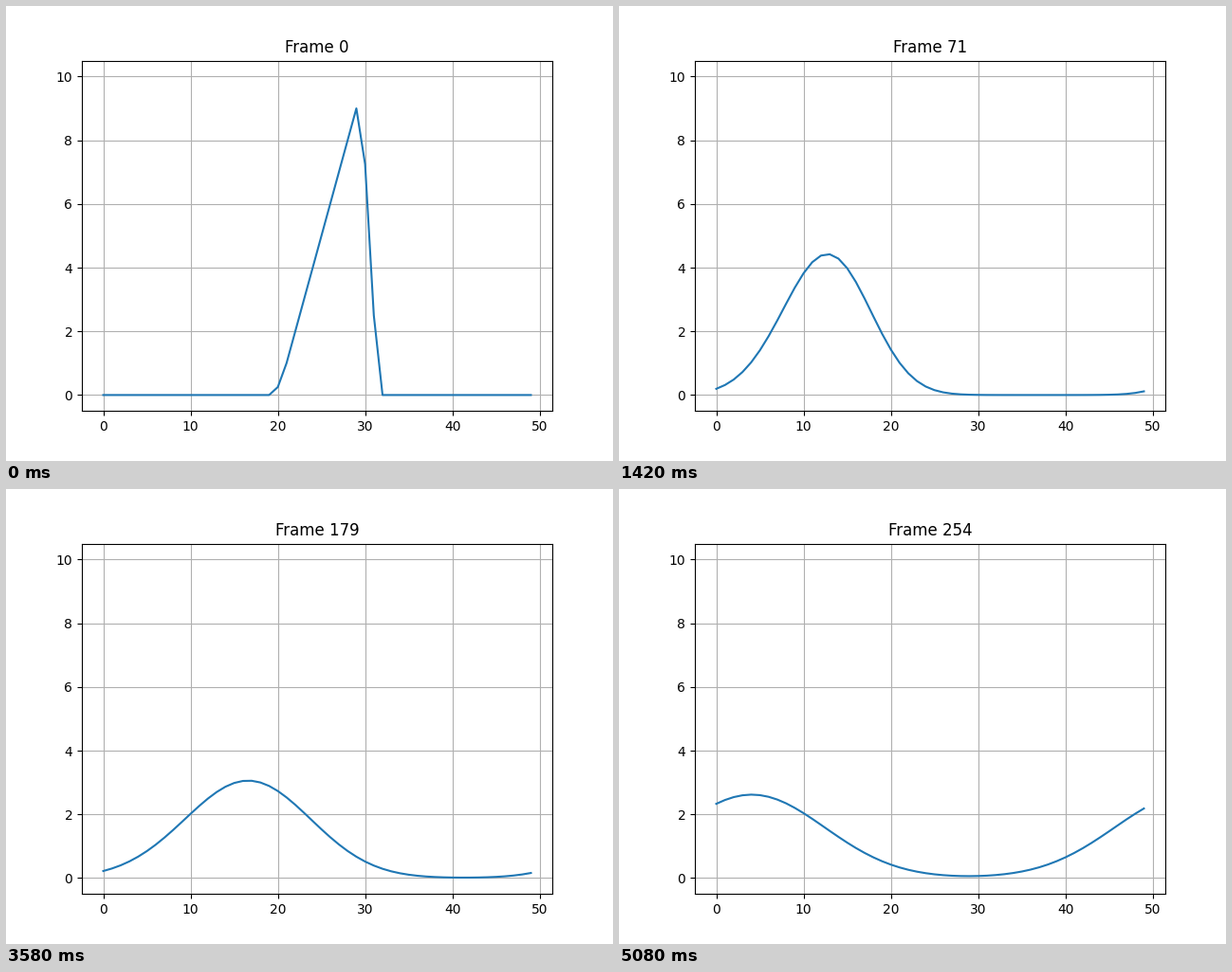
Animation, 640 px wide and 480 px high, one loop 5100 ms. Source, as a matplotlib script:

```python
import numpy as np
import matplotlib.pyplot as plt
from matplotlib.animation import FuncAnimation

POINTS = 50
FRAMES = 255
INTERVAL = 20
COURANT = 0.5
WARMUP = 2  # upwind steps already taken when the loop starts


def advect(u):
    """One upwind step on a periodic domain."""
    return u - COURANT * (u - np.roll(u, 1))


x = np.arange(POINTS)
initial = np.where((x >= 19) & (x <= 29), x - 19.0, 0.0)

states = [initial]
for _ in range(FRAMES + WARMUP - 1):
    states.append(advect(states[-1]))

fig, ax = plt.subplots(figsize=(6.4, 4.8), dpi=100)
line, = ax.plot(x, initial, color="tab:blue", lw=1.5)
ax.set_xlim(-2.45, 51.45)
ax.set_ylim(-0.5, 10.5)
ax.grid(True)
title = ax.set_title("Frame 0")


def update(frame):
    line.set_ydata(states[frame + WARMUP])
    title.set_text(f"Frame {frame}")
    return line, title


anim = FuncAnimation(fig, update, frames=FRAMES, interval=INTERVAL,
                     init_func=lambda: update(0), repeat=True, repeat_delay=0)
plt.show()
```
